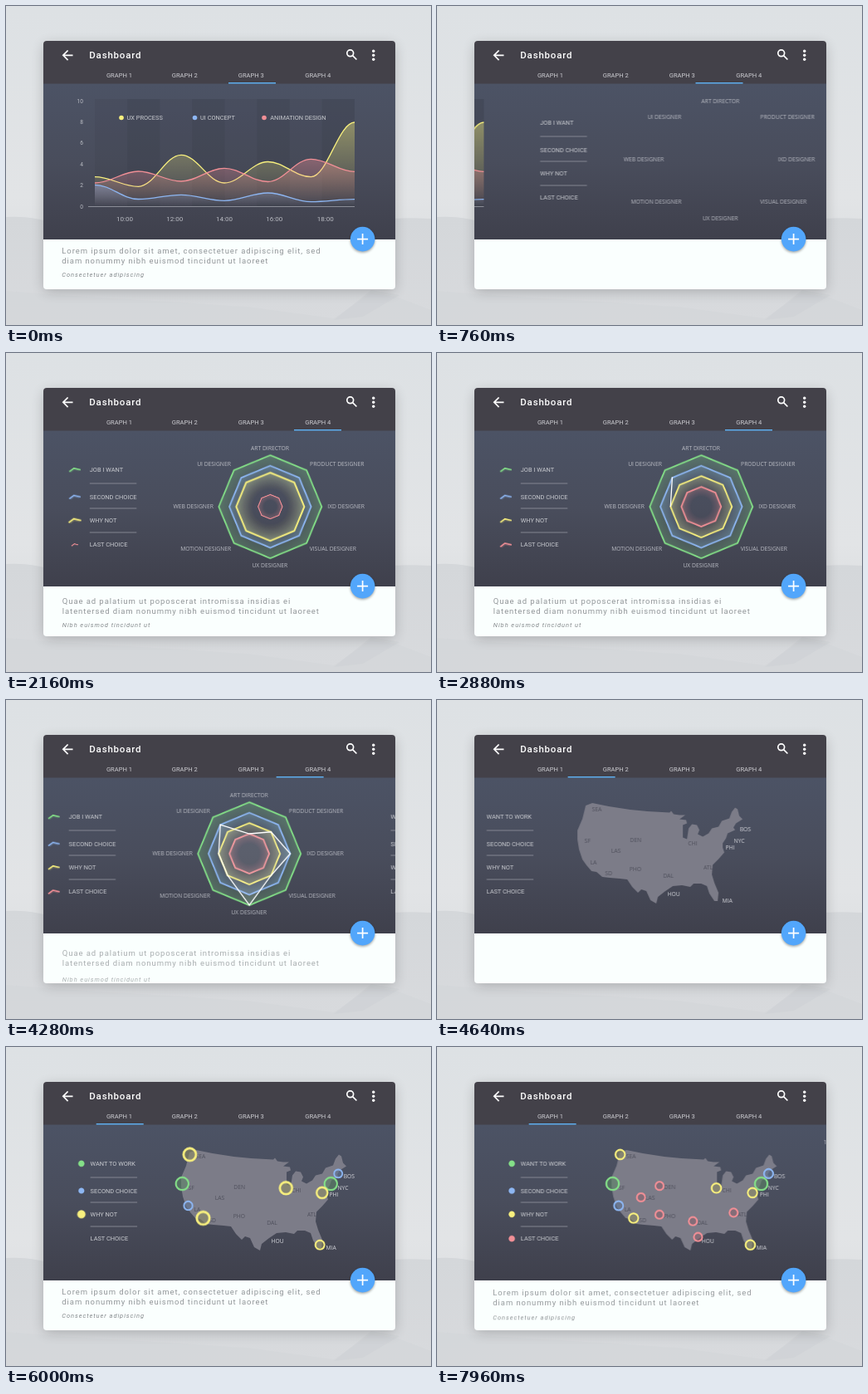
An HTML page for the animation above (8000 ms loop, 512 px wide and 384 px high).

```html
<!DOCTYPE html>
<html lang="en">
<head>
<meta charset="utf-8">
<title>Dashboard</title>
<style>
html, body { margin: 0; width: 100%; height: 100%; overflow: hidden; background: #dfe2e5; }
svg { display: block; width: 100%; height: 100%; }
text { font-family: Roboto, sans-serif; }
.title { font-size: 11.5px; font-weight: 500; letter-spacing: .8px; fill: #fff; }
.tab { font-size: 7.6px; fill: #cdcdd2; text-anchor: middle; }
.label { font-size: 7.4px; fill: #c9cbd0; }
.tag { font: 6.75px "Open Sans", sans-serif; fill: #b9bbc3; }
.city { font: 6.75px "Open Sans", sans-serif; fill: #50515d; }
.city.out { fill: #d3d4da; }
.num { font-size: 6.6px; fill: #bbbdc4; text-anchor: end; }
.hour { font-size: 8px; fill: #bbbdc4; text-anchor: middle; }
.copy { font-size: 9.5px; letter-spacing: .92px; fill: #929699; }
.note { font-size: 7.5px; letter-spacing: .93px; font-style: italic; fill: #84888b; }

.slide, .bar, .copy, .note, .pop, .grow, .trace {
  animation-duration: 8s; animation-iteration-count: infinite;
  animation-timing-function: linear; animation-fill-mode: both;
}
.note { animation-delay: -30ms; }
.pop { animation-name: pop; }
.grow { animation-name: grow; }
.bar { animation-name: bar; }
.trace { animation-name: trace; stroke-dasharray: 1 2; }
#chart { animation-name: chart; }
#radar { animation-name: radar; }
#map { animation-name: map; }
.first > * { animation-name: first; }
.second > * { animation-name: second; }
.third > * { animation-name: third; }

@keyframes chart {
  0% { transform: none; }
  5.25% { transform: none; animation-timing-function: cubic-bezier(.46,0,.26,1.55); }
  14% { transform: translateX(-387px); }
  14.01%, 98.49% { transform: translateX(500px); }
  98.5% { transform: translateX(381px); }
  99.25% { transform: translateX(381px); animation-timing-function: cubic-bezier(.33,0,.67,.33); }
  100% { transform: translateX(375px); }
}
@keyframes radar {
  0% { transform: translateX(387px); }
  5.25% { transform: translateX(387px); animation-timing-function: cubic-bezier(.46,0,.26,1.55); }
  14% { transform: none; }
  52.25% { transform: none; animation-timing-function: cubic-bezier(.46,0,.26,1.55); }
  61% { transform: translateX(-387px); }
  61.01%, 100% { transform: translateX(-500px); }
}
@keyframes map {
  0% { transform: translateX(387px); }
  52.25% { transform: translateX(387px); animation-timing-function: cubic-bezier(.46,0,.26,1.55); }
  61% { transform: none; }
  99.25% { transform: none; animation-timing-function: cubic-bezier(.33,0,.67,.33); }
  100% { transform: translateX(-6px); }
}
@keyframes bar {
  0% { transform: translateX(268px); }
  4.94% { transform: translateX(268px); animation-timing-function: cubic-bezier(.33,0,.67,1); }
  13.5% { transform: translateX(347px); }
  51.94% { transform: translateX(347px); animation-timing-function: cubic-bezier(.33,0,.67,1); }
  60.5% { transform: translateX(108.7px); }
  98.94% { transform: translateX(108.7px); animation-timing-function: cubic-bezier(.33,0,.67,.33); }
  100% { transform: translateX(115.4px); }
}
@keyframes first {
  0% { transform: none; opacity: 1; }
  4.875% { transform: none; opacity: 1; animation-timing-function: cubic-bezier(.33,0,.67,.33); }
  8.425%, 100% { transform: translateY(28px); opacity: 0; }
}
@keyframes second {
  0% { transform: translateY(28px); opacity: 0; }
  12% { transform: translateY(28px); opacity: 0; animation-timing-function: cubic-bezier(.2,.7,.3,1); }
  17% { transform: none; opacity: 1; }
  51.875% { transform: none; opacity: 1; animation-timing-function: cubic-bezier(.33,0,.67,.33); }
  55.425%, 100% { transform: translateY(28px); opacity: 0; }
}
@keyframes third {
  0% { transform: translateY(28px); opacity: 0; }
  59% { transform: translateY(28px); opacity: 0; animation-timing-function: cubic-bezier(.2,.7,.3,1); }
  64% { transform: none; opacity: 1; }
  98.875% { transform: none; opacity: 1; animation-timing-function: cubic-bezier(.33,0,.67,.33); }
  100% { transform: translateY(2.8px); opacity: .9; }
}
@keyframes pop {
  0% { transform: scale(0); animation-timing-function: ease-in; }
  1.5% { transform: scale(.95); animation-timing-function: ease-out; }
  3% { transform: scale(1.35); animation-timing-function: ease-in-out; }
  5.6% { transform: scale(.9); animation-timing-function: ease-in-out; }
  7.5%, 59.9% { transform: none; }
  60%, 100% { transform: scale(0); }
}
@keyframes grow {
  0% { transform: scale(0); animation-timing-function: ease-out; }
  3% { transform: scale(1.12); animation-timing-function: ease-in-out; }
  5.5%, 59.9% { transform: none; }
  60%, 100% { transform: scale(0); }
}
@keyframes trace {
  0% { stroke-dashoffset: 1; stroke-opacity: 0; fill-opacity: 0; }
  33.7% { stroke-dashoffset: 1; stroke-opacity: 0; }
  33.75% { stroke-dashoffset: 1; stroke-opacity: 1; animation-timing-function: cubic-bezier(.33,0,.67,1); }
  40% { fill-opacity: 0; }
  44%, 100% { stroke-dashoffset: 0; stroke-opacity: 1; fill-opacity: .1; }
}
</style>
</head>
<body>
<svg viewBox="0 0 512 384" preserveAspectRatio="none">
  <defs>
    <linearGradient id="sky" x2="0" y2="1">
      <stop stop-color="#dde1e4"/><stop offset=".6" stop-color="#e2e4e6"/><stop offset="1" stop-color="#d5d8db"/>
    </linearGradient>
    <linearGradient id="mist" x2="0" y2="1">
      <stop stop-color="#d4d7da"/><stop offset="1" stop-color="#d8dadd"/>
    </linearGradient>
    <linearGradient id="body" x2="0" y2="1">
      <stop stop-color="#4c5365"/><stop offset=".5" stop-color="#494d5c"/><stop offset="1" stop-color="#3f404c"/>
    </linearGradient>
    <clipPath id="card"><rect x="45" y="42" width="424" height="299" rx="4"/></clipPath>
    <clipPath id="stage"><rect x="45" y="93" width="424" height="188"/></clipPath>
    <filter id="soft" x="-20%" y="-20%" width="140%" height="150%"><feGaussianBlur stdDeviation="8"/></filter>
    <filter id="near" x="-40%" y="-40%" width="180%" height="180%"><feGaussianBlur stdDeviation="1.5"/></filter>
  </defs>

  <rect width="512" height="384" fill="url(#sky)"/>
  <path d="M0 254Q30 252 60 262L200 275 400 268Q450 252 512 256V384H0Z" fill="url(#mist)"/>
  <path d="M0 343Q60 348 130 352T290 362L395 376 440 345 470 350 512 366V384H0Z" fill="#cdd0d3" opacity=".35"/>
  <path d="M395 378L440 342 474 348 430 374Z" fill="#c3c6c9" opacity=".25"/>

  <rect x="46" y="47" width="422" height="296" rx="4" opacity=".22" filter="url(#soft)"/>
  <g clip-path="url(#card)">
    <rect x="45" y="42" width="424" height="299" fill="#fafffe"/>
    <rect x="45" y="93" width="424" height="188" fill="url(#body)"/>
    <rect x="45" y="42" width="424" height="51.5" fill="#434149"/>
    <g id="tabs"></g>
    <rect class="bar" y="92" width="57" height="1.5" fill="#5fb0f0"/>
    <g fill="none" stroke="#fff" stroke-width="1.7">
      <path d="M80.5 59.3H69M74.6 53.5L68.8 59.3l5.8 5.8"/>
      <circle cx="414.7" cy="56.8" r="3.9"/><path d="M417.5 59.6L422.4 64.5"/>
    </g>
    <g fill="#fff">
      <circle cx="442.7" cy="54.2" r="1.7"/><circle cx="442.7" cy="59.2" r="1.7"/><circle cx="442.7" cy="64.2" r="1.7"/>
    </g>
    <text class="title" x="100.3" y="63.3">Dashboard</text>
    <g clip-path="url(#stage)">
      <g id="chart" class="slide"></g>
      <g id="radar" class="slide"></g>
      <g id="map" class="slide"></g>
    </g>
    <g id="copy"></g>
  </g>
  <circle cx="429.6" cy="282" r="14.8" opacity=".35" filter="url(#near)"/>
  <circle cx="429.6" cy="280.6" r="14.8" fill="#52a6fb"/>
  <path d="M423.1 280.6h13M429.6 274.1v13" stroke="#fff" stroke-width="1.7"/>
</svg>

<script>
const color = { green: '#84e088', blue: '#8db6f2', yellow: '#f8f07e', red: '#f18f96' };
const hues = Object.values(color);
const rows = [140.3, 173, 201.3, 230.7];
const put = (id, ...parts) => { document.getElementById(id).innerHTML = parts.flat().join(''); };
const text = (cls, x, y, str, extra = '') => `<text class="${cls}" x="${x}" y="${y}" ${extra}>${str}</text>`;
const animated = (cls, x, y, delay, content) =>
  `<g transform="translate(${x} ${y})"><g class="${cls}" style="animation-delay:${delay}ms">${content}</g></g>`;
const legend = (x, labels) => [
  ...labels.map((s, i) => text('label', x, rows[i] + 2.7, s)),
  ...[157, 187, 216].map(y => `<path d="M${x} ${y}h56.5" stroke="#8c8e98" stroke-width=".9"/>`)
];
const fade = (id, hue, top) => `<linearGradient id="${id}" x2="0" y2="1">
  <stop stop-color="${hue}" stop-opacity="${top}"/><stop offset="1" stop-color="${hue}" stop-opacity="0"/></linearGradient>`;

put('tabs', [136.5, 215.3, 295.3, 375.8].map((x, i) => text('tab', x, 86, `GRAPH ${i + 1}`)));

// Line chart: extremes joined by curves with level tangents
const stops = [107, 159.5, 211, 263, 315.5, 367.5, 420];
function wave(ys, hue, id, top) {
  let d = `M${stops[0]} ${ys[0]}`;
  for (let i = 1; i < ys.length; i++) {
    const reach = (stops[i] - stops[i - 1]) * .37;
    d += `C${stops[i - 1] + reach} ${ys[i - 1]} ${stops[i] - reach} ${ys[i]} ${stops[i]} ${ys[i]}`;
  }
  return fade(id, hue, top) + `<path d="${d}V241.5H107Z" fill="url(#${id})"/>
    <path d="${d}" fill="none" stroke="${hue}" stroke-width="1.3"/>`;
}
put('chart',
  '<rect x="107" y="112" width="313" height="129" fill="#30323c" opacity=".1"/>',
  [1, 3, 5, 7].map(i => `<rect x="${107 + i * 39.1}" y="112" width="39.1" height="129" fill="#30323c" opacity=".14"/>`),
  wave([205.7, 217.3, 179.3, 213, 187.5, 205.7, 140], color.yellow, 'w1', .42),
  wave([213, 199, 211, 195.3, 211.5, 184.3, 199.3], color.red, 'w2', .38),
  wave([215.3, 232.5, 227.3, 234.3, 225, 235.7, 232.7], color.blue, 'w3', .35),
  '<path d="M99 241.5H420" stroke="#8c8e98"/>',
  [10, 8, 6, 4, 2, 0].map((n, i) => text('num', 93, 116.5 + i * 25.45, n)),
  [143, 203.3, 263, 323.3, 384.7].map((x, i) => text('hour', x, 259, `${10 + i * 2}:00`)),
  [[139, 'UX PROCESS', color.yellow, 145.5], [227.5, 'UI CONCEPT', color.blue, 234], [311, 'ANIMATION DESIGN', color.red, 318.3]]
    .map(([x, s, hue, tx]) => `<circle cx="${x}" cy="134.5" r="2.8" fill="${hue}"/>` + text('label', tx, 137.3, s))
);

// Radar
const radii = [62, 49.3, 37, 24];
const corner = (r, i) => [r * Math.sin(i * Math.PI / 4), -r * Math.cos(i * Math.PI / 4)].map(v => v.toFixed(1)).join(' ');
const octagon = r => Array.from({ length: 8 }, (_, i) => corner(r, i)).join(' ');
const start = i => 1500 + i * 190;
// ring index per corner, clockwise from the left one
const score = [2, 1, 3, 2, 1, 2, 0, 2].map((ring, i) => corner(radii[ring], i + 6));
put('radar',
  legend(100.8, ['JOB I WANT', 'SECOND CHOICE', 'WHY NOT', 'LAST CHOICE']),
  hues.map((hue, i) => animated('grow', 83, rows[i], start(i),
    `<path d="M-6.8 2.6L-1.2 -1.6 6.8 .2" fill="none" stroke="${hue}" stroke-width="1.7"/>
     <path d="M-5 3.2L-.8 .2 5 1.4" fill="none" stroke="${hue}" stroke-opacity=".25"/>`)),
  hues.map((hue, i) => `<radialGradient id="g${i}"><stop offset=".5" stop-color="${hue}" stop-opacity="0"/>
    <stop offset="1" stop-color="${hue}" stop-opacity=".27"/></radialGradient>` +
    animated('grow', 318.3, 185, start(i),
      `<polygon points="${octagon(radii[i])}" fill="url(#g${i})" stroke="${hue}" stroke-width="1.8"/>`)),
  `<g transform="translate(318.3 185)"><path class="trace" pathLength="1" d="M${score.join('L')}Z" fill="#fff" stroke="#fff" stroke-width="1.3"/></g>`,
  [[318, 116.6, 'ART DIRECTOR'], [250.5, 136, 'UI DESIGNER'], [398.7, 136.3, 'PRODUCT DESIGNER'], [225.7, 187, 'WEB DESIGNER'],
   [409.6, 187, 'IXD DESIGNER'], [240.7, 237.8, 'MOTION DESIGNER'], [393.8, 237.8, 'VISUAL DESIGNER'], [317.8, 258.4, 'UX DESIGNER']]
    .map(([x, y, s]) => text('tag', x, y, s, 'text-anchor="middle"'))
);

// Map
const land = `M221 127L229 124Q272 134 322 135.5l2-2 3 4 7 1 7 0-7 5 8 1 1 4-5 2 0 15 5 2 2-13 4-5 6 1 3 6-2 5 6 3
  7-4 4-6 8-2 4-7 9-3 3-8 4-5 3 2 2 8 4 4-8 5-3 5 2 3-9 4-2 6-4 6 0 5 2 6-7 8-7 7L373 210 376 220 381 232 380 242
  376 242 370 233 367 224 360 221 351 221 347 225 337 223 326 224 317 230 308 237 306 245 299 241 294 230 288 228
  284 232 277 225 271 216 262 215 250 214 241 213 234 207 228 206 222 199 217 192 213 180 211 168 211 157 217 143Z`;
const cities = [['SEA', 228.5, 134], ['SF', 219.5, 172], ['LA', 226.5, 197.5], ['SD', 244.3, 210.5], ['LAS', 251.7, 184],
  ['DEN', 274.3, 170.5], ['PHO', 273.7, 206], ['DAL', 314.3, 213.7], ['CHI', 344.3, 174.7], ['ATL', 363, 203.5]];
const coast = [['HOU', 319.5, 235.7], ['PHI', 389.5, 180.2], ['NYC', 399.5, 172], ['BOS', 406.7, 158], ['MIA', 385.5, 243.5]];
const pins = [
  { hue: color.green, r: 7.6, at: 5240, spots: [[212.3, 164.5], [391.3, 164.6]] },
  { hue: color.blue, r: 5.5, at: 5480, spots: [[219.5, 191], [400.2, 152.4]] },
  { hue: color.yellow, r: 5.7, at: 5720, spots: [[221.4, 129.4], [237.5, 206], [337.3, 169.8], [380.8, 175.4], [378.2, 238.2]] },
  { hue: color.red, r: 5, at: 6040, spots: [[246.5, 181], [268.8, 167.2], [358, 199.4], [268.7, 201.8], [309, 209.7], [315.2, 228.7]] }
];
put('map',
  `<path d="${land}" fill="#7c7c88"/>`,
  legend(101.6, ['WANT TO WORK', 'SECOND CHOICE', 'WHY NOT', 'LAST CHOICE']),
  cities.map(([s, x, y]) => text('city', x, y, s)),
  coast.map(([s, x, y]) => text('city out', x, y, s)),
  pins.map(({ hue, r, at, spots }, i) =>
    animated('pop', 90.8, rows[i], at, `<circle r="3.8" fill="${hue}"/>`) +
    spots.map(([x, y], n) => animated('pop', x, y, at + n * 40,
      `<circle r="${r}" fill="#3f434d" fill-opacity=".45"/><circle r="${r}" fill="${hue}" fill-opacity=".25" stroke="${hue}" stroke-width="2.1"/>`)).join(''))
);

// Captions
const caption = (cls, x, y, a, b, c) =>
  `<g class="${cls}">${text('copy', x, y, a)}${text('copy', x, y + 12, b)}${text('note', x, y + 27.9, c)}</g>`;
const lorem = [67.3, 298.2, 'Lorem ipsum dolor sit amet, consectetuer adipiscing elit, sed',
  'diam nonummy nibh euismod tincidunt ut laoreet', 'Consectetuer adipiscing'];
put('copy',
  caption('first', ...lorem),
  caption('second', 67.8, 302, 'Quae ad palatium ut poposcerat intromissa insidias ei',
    'latentersed diam nonummy nibh euismod tincidunt ut laoreet', 'Nibh euismod tincidunt ut'),
  caption('third', ...lorem)
);
</script>
</body>
</html>
```
